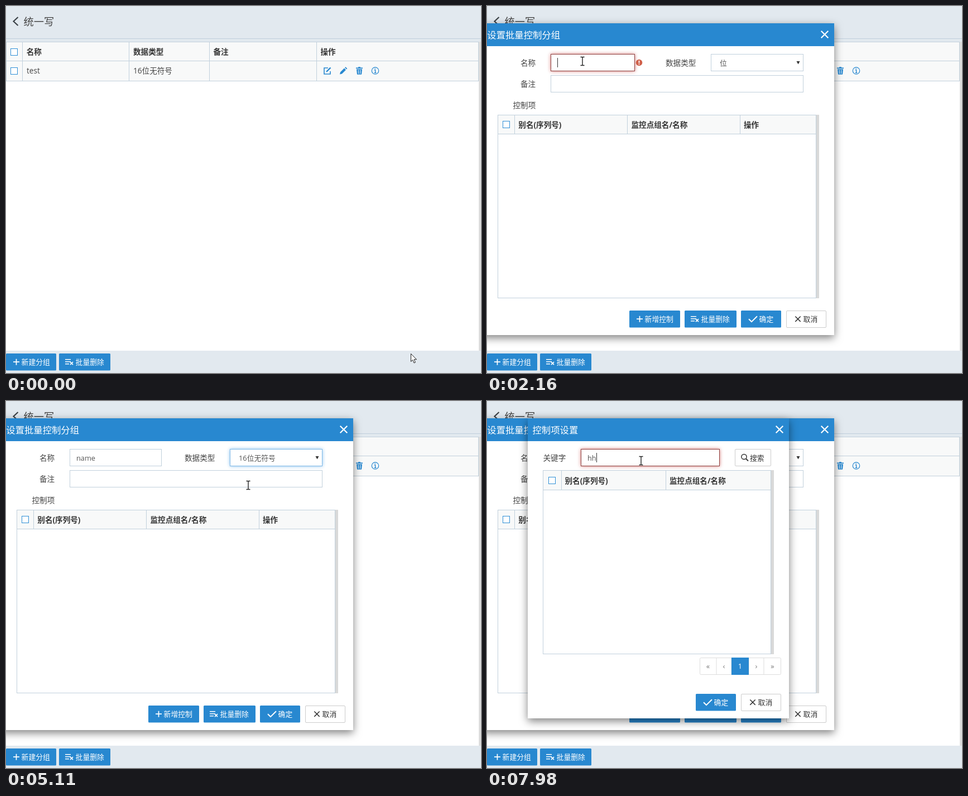
An HTML page for the animation above (8000 ms loop, 851 by 658 pixels).

```html
<!DOCTYPE html>
<html lang="zh-CN">
<head>
<meta charset="utf-8">
<title>统一写</title>
<style>
  html, body { margin: 0; width: 100%; height: 100%; overflow: hidden; background: #fff; }
  svg { display: block; }
  text { font-family: "Open Sans", "Noto Sans CJK SC", "Noto Sans CJK", sans-serif; white-space: pre; }
  .hint { font-family: "Noto Sans CJK SC", "Noto Sans CJK", sans-serif; }
  .dialog { filter: drop-shadow(0 5px 7.5px rgba(0, 0, 0, .5)); }
  .blue { stroke: #7fb8e6; filter: drop-shadow(0 0 3px rgba(102, 175, 233, .75)); }
  .red { stroke: #8d3c3b; filter: drop-shadow(0 0 3px rgba(206, 100, 98, .85)); }
</style>
</head>
<body>
<svg id="stage" width="851" height="658" viewBox="0 0 851 658"></svg>
<script>
const BLUE = '#2888d0', LINE = '#c1d0dc', BAR = '#e2e9ef', HEAD = '#f8f9f9', INK = '#444';

// Markup helpers; text is placed by the middle of its line.
const rect = (x, y, w, h, fill, more = '') =>
  `<rect x="${x}" y="${y}" width="${w}" height="${h}" fill="${fill}" ${more}/>`;
const box = (x, y, w, h, fill = '#fff', stroke = LINE, more = '') =>
  rect(x + .5, y + .5, w, h, fill, `stroke="${stroke}" ${more}`);
const text = (x, y, size, str, fill = INK, more = '') =>
  `<text x="${x}" y="${y + size * .37}" font-size="${size}" fill="${fill}" ${more}>${str}</text>`;
const bold = (x, y, str) => text(x, y, 13.6, str, '#333', 'font-weight="700"');
const path = (d, stroke, width = 1, more = '') =>
  `<path d="${d}" fill="none" stroke="${stroke}" stroke-width="${width}" ${more}/>`;
const group = (id, body, more = '') => `<g id="${id}" ${more}>${body}</g>`;
const vlines = (xs, y1, y2) => path(xs.map(x => `M${x + .5} ${y1}V${y2}`).join(''), LINE);
const hlines = (ys, x1, x2) => path(ys.map(y => `M${x1} ${y + .5}H${x2}`).join(''), LINE);
const cross = (x, y, r, stroke, width) =>
  path(`M${x - r} ${y - r}L${x + r} ${y + r}M${x + r} ${y - r}L${x - r} ${y + r}`, stroke, width);
const check = (x, y) => box(x, y, 12, 12, '#fff', '#2f8fd6');

const ICONS = {
  plus: (x, y) => path(`M${x + 13} ${y}h11M${x + 18.5} ${y - 5.5}v11`, '#fff', 1.7),
  list: (x, y) => path(`M${x + 11} ${y - 4.5}h10M${x + 11} ${y - .5}h10M${x + 11} ${y + 3.5}h7`, '#fff', 1.6) +
    cross(x + 22.5, y + 2.5, 2.5, '#fff', 1.7),
  tick: (x, y) => path(`M${x + 14} ${y}l5 5l10-10`, '#fff', 2),
  cross: (x, y) => cross(x + 21, y, 4.7, '#333', 1.5)
};
function button(x, y, w, icon, label, dx, id = '') {
  const plain = icon === 'cross', mid = y + 15.2;
  return (plain ? box(x, y, w - 1, 30, '#fff', '#ccc', 'rx="1.5"')
                : rect(x, y, w, 30.5, BLUE, `rx="1.5" id="${id}"`)) +
    ICONS[icon](x, mid) + text(x + dx - .4, mid, 12.8, label, plain ? '#333' : '#fff');
}
const alertIcon = (id, x) => group(id,
  `<circle cx="${x}" cy="101.5" r="5.8" fill="#d0604a"/>` + rect(x - .9, 97.8, 1.8, 4.6, '#fff') + rect(x - .9, 103.4, 1.8, 1.8, '#fff'));
const caret = (id, x) => group(id, rect(0, 93, 1, 17, '#333'), `transform="translate(${x} 0)"`);

const page =
  rect(0, 0, 851, 658, '#fff') + rect(0, 0, 851, 64, BAR) + hlines([58], 0, 851) +
  path('M21.5 20L13.5 27.5L21.5 35', '#3c4247', 2.2) +
  text(31.5, 28, 18.2, '统一写', '#444', 'font-weight="300"') +
  rect(0, 64, 847, 71, HEAD) + hlines([64, 98, 134], 0, 847) +
  vlines([0, 29, 220, 364, 556, 846], 64, 135) + rect(847, 64, 4, 554, '#ddd') +
  check(8, 76) + check(8, 110) +
  bold(36.7, 82, '名称') + bold(228, 82, '数据类型') + bold(371.5, 82, '备注') + bold(563.5, 82, '操作') +
  text(37, 116, 13.6, 'test') + text(228, 116, 13.6, '16位无符号') +
  path('M577 111H570V122H581V117', BLUE, 1.6) + path('M574 118L581.5 110.5', BLUE, 2.4) +
  `<path fill="${BLUE}" d="M598 122.5l1-4 7-7 3 3-7 7zM607 110.5l1.4-1.3 3 3-1.4 1.4z
     M627 110.5h4v-1.3h4v1.3h4v1.8h-12zM628 113.2h10l-1 9.6h-8z"/>` +
  path('M631.2 114.5l.3 7M634.8 114.5l-.3 7', '#fff', 1) +
  `<circle cx="661.5" cy="116" r="6.2" fill="none" stroke="${BLUE}" stroke-width="1.2"/>` +
  path('M660 115h1.7v4.3M659.8 119.5h3.6M661.2 111.8v1.7', BLUE, 1.3) +
  rect(0, 618, 851, 40, BAR) +
  button(0, 623, 90, 'plus', '新建分组', 28, 'create') + button(95, 623, 92, 'list', '批量删除', 30);

const frame = (x, w, h, title, tx) =>
  rect(x, 31, w, h, '#fff', 'class="dialog"') + rect(x, 31, w, 41, BLUE) +
  text(tx, 51.5, 16.35, title, '#fff') + cross(x + w - 17, 51, 6.3, '#fff', 2.2);

const groupDialog = group('d1',
  frame(-10, 632, 559, '设置批量控制分组', .3) +
  text(60, 102, 13.6, '名称') + text(320, 102, 13.6, '数据类型') +
  text(60, 140, 13.6, '备注') + text(46.5, 178, 13.6, '控制项') +
  box(114, 124, 452, 30) + box(114, 86, 150, 30, '#fff', LINE, 'id="nameBox"') + alertIcon('alert1', 272.5) +
  text(126, 102, 12.8, '', '#555', 'id="name"') + caret('caret1', 126) +
  box(401, 86, 165, 30, '#fff', LINE, 'id="typeBox"') + text(417, 102, 12.8, '位', '#555', 'id="type"') +
  '<path d="M554.5 99h6l-3 5.5z" fill="#333"/>' +
  rect(589, 195, 6, 329, '#d9d9d9') + box(19, 195, 570, 328) + rect(20, 196, 569, 33, HEAD) +
  hlines([229], 19, 589) + vlines([49, 251, 453], 195, 229) + check(28, 206) +
  bold(56.3, 212.5, '别名(序列号)') + bold(258.5, 212.5, '监控点组名/名称') + bold(460, 212.5, '操作') +
  button(255, 546, 91, 'plus', '新增控制', 28, 'add') + button(354, 546, 93, 'list', '批量删除', 30) +
  button(455, 546, 72, 'tick', '确定', 33) + button(536, 546, 72, 'cross', '取消', 31));

const TYPES = ['位', '16位无符号', '16位有符号', '16位BCD码', '32位无符号', '32位有符号',
  '32位BCD码', '32位浮点', '64位无符号', '64位有符号', '64位浮点'];
const ROW = 19.6;
const menu = group('menu',
  box(401, 117, 165, 217, '#fff', '#7a9cb8') + rect(402, 118, 164, ROW, '#1e90ff', 'id="mark"') +
  TYPES.map((s, i) => text(417, 118 + ROW * (i + .5), 12.8, s, '#555', 'class="opt"')).join(''));

const itemDialog = group('d2',
  frame(73, 468, 538, '控制项设置', 81.5) +
  text(100.5, 102, 13.6, '关键字') + box(168, 86, 234, 30, '#fff', LINE, 'id="keyBox"') + alertIcon('alert2', 411) +
  '<clipPath id="clip"><rect x="180" y="88" width="212" height="28"/></clipPath>' +
  group('hint', text(180, 102, 12.7, '请输入监控点名称,多个名称之间用|隔开', '#999', 'class="hint"'), 'clip-path="url(#clip)"') +
  text(180, 102, 12.8, '', '#555', 'id="key"') + caret('caret2', 180) +
  box(444, 86, 64, 30, '#fff', '#ccc', 'rx="1.5"') +
  group('search', '<circle cx="460.5" cy="100" r="4.6" fill="none" stroke="#333" stroke-width="1.5"/>' +
    path('M464 103.5l4 4', '#333', 1.8) + text(471, 102, 12.8, '搜索', '#333')) +
  rect(508, 124, 6, 330, '#d9d9d9') + box(100, 124, 408, 329) + rect(101, 125, 407, 34, HEAD) +
  hlines([159], 100, 508) + vlines([133, 320], 124, 159) + check(110, 136) +
  bold(139.5, 142.5, '别名(序列号)') + bold(327, 142.5, '监控点组名/名称') +
  box(381, 460, 145, 30, '#fff', '#ddd', 'rx="2"') + path('M411 460v31M438 460v31M469 460v31M496 460v31', '#ddd') +
  rect(438, 460, 31, 31, BLUE, 'id="current"') +
  ['«', '‹', '1', '›', '»'].map((s, i) => text([396, 424.5, 453.5, 482.5, 511.5][i], 475.5, 12.8, s,
    i === 2 ? BLUE : '#777', `text-anchor="middle" ${i === 2 ? 'id="one"' : ''}`)).join('') +
  button(374, 525, 72, 'tick', '确定', 33) + button(455, 525, 72, 'cross', '取消', 31));

const pointers =
  group('arrow', '<path d="M.5 .5V14.5L3.7 11.5L6 17L8.4 16L6.1 10.7H10.5z" fill="#fff" stroke="#222"/>') +
  group('beam', path('M-3.5-7.5H-1Q0-7.5 0-6.5Q0-7.5 1-7.5H3.5M0-6.5V6.5M-3.5 7.5H-1Q0 7.5 0 6.5Q0 7.5 1 7.5H3.5', '#222', 1.4));

document.getElementById('stage').innerHTML = page + groupDialog + menu + itemDialog + pointers;

const $ = id => document.getElementById(id);
const show = (id, on) => $(id).style.display = on ? '' : 'none';
const within = (t, ...spans) => spans.some(([a, b]) => t >= a && t < b);
const typed = (t, word, times) => word.slice(0, times.filter(k => t >= k).length);

// Pointer moves: first step, last step, steps, end point, bend point.
const START = [725, 623];
const MOVES = [
  [70, 840, 11, [58, 637], [390, 296]],
  [1070, 1310, 4, [427, 129], [240, 330]],
  [1550, 2090, 8, [171, 99], [300, 104]],
  [4100, 4440, 5, [457, 108], [310, 96]],
  [4620, 4780, 3, [457, 142], [457, 125]],
  [5110, 5880, 11, [318, 556], [-40, 330]],
  [6180, 6350, 2, [320, 518], [319, 535]],
  [6420, 6970, 8, [275.5, 107], [310, 280]]
];
function pointer(t) {
  let from = START;
  for (const [a, b, n, to, via] of MOVES) {
    if (t < a) break;
    const step = Math.min(n, Math.floor((t - a) / ((b - a) / (n - 1)) + 1e-6) + 1);
    const p = step / n, u = p * p * (3 - 2 * p), v = 1 - u;
    from = from.map((f, i) => v * v * f + 2 * u * v * via[i] + u * u * to[i]);
  }
  return from;
}
const inside = (x, y, l, top, r, bottom) => x > l && x < r && y > top && y < bottom;

function render(t) {
  const [x, y] = pointer(t);
  const first = t >= 920, second = t >= 6350, open = within(t, [4500, 4880]);
  show('d1', first);
  show('d2', second);
  show('menu', open);

  const name = typed(t, 'name', [2940, 3080, 3240, 3330]), valid = t >= 3080;
  $('name').textContent = name;
  $('nameBox').setAttribute('width', valid ? 164 : 150);
  $('nameBox').setAttribute('class', within(t, [1070, 3080]) ? 'red' : within(t, [3080, 4500]) ? 'blue' : '');
  show('alert1', !valid);
  show('caret1', within(t, [1070, 1550], [2160, 2620], [2940, 3860], [4390, 4500]));
  $('caret1').setAttribute('transform', `translate(${126 + [0, 8, 15, 27, 34][name.length]} 0)`);

  $('type').textContent = TYPES[t >= 4880 ? 1 : 0];
  $('typeBox').setAttribute('class', within(t, [4500, 6180]) ? 'blue' : '');
  const row = y > 137 ? 1 : 0;
  $('mark').setAttribute('y', 118 + ROW * row);
  document.querySelectorAll('.opt').forEach((o, i) => o.setAttribute('fill', i === row ? '#fff' : '#555'));

  const key = typed(t, 'hh', [7600, 7840]), wide = t >= 7980;
  $('key').textContent = key;
  show('hint', !key);
  $('keyBox').setAttribute('width', wide ? 248 : 234);
  $('keyBox').setAttribute('class', t >= 6420 ? 'red' : '');
  show('alert2', !wide);
  show('caret2', within(t, [6350, 6900], [7430, 8000]));
  $('caret2').setAttribute('transform', `translate(${180 + 8 * key.length} 0)`);
  $('search').setAttribute('opacity', t >= 7840 ? 1 : .6);
  show('current', t >= 6420);
  $('one').setAttribute('fill', t >= 6420 ? '#fff' : BLUE);

  const tint = (id, on) => $(id).setAttribute('fill', on ? '#3276b5' : BLUE);
  tint('create', inside(x, y, 0, 622, 90, 654));
  tint('add', !second && inside(x, y, 255, 546, 346, 577));

  const beam = !open && first && (second ? inside(x, y, 168, 86, 403, 117)
    : inside(x, y, 114, 124, 567, 155) || inside(x, y, 114, 86, valid ? 279 : 265, 117));
  show('beam', beam);
  show('arrow', !beam);
  $(beam ? 'beam' : 'arrow').setAttribute('transform', `translate(${Math.round(x)} ${Math.round(y)})`);
}

const begin = performance.now();
function tick() {
  render((performance.now() - begin) % 8000);
  requestAnimationFrame(tick);
}
tick();
</script>
</body>
</html>
```
